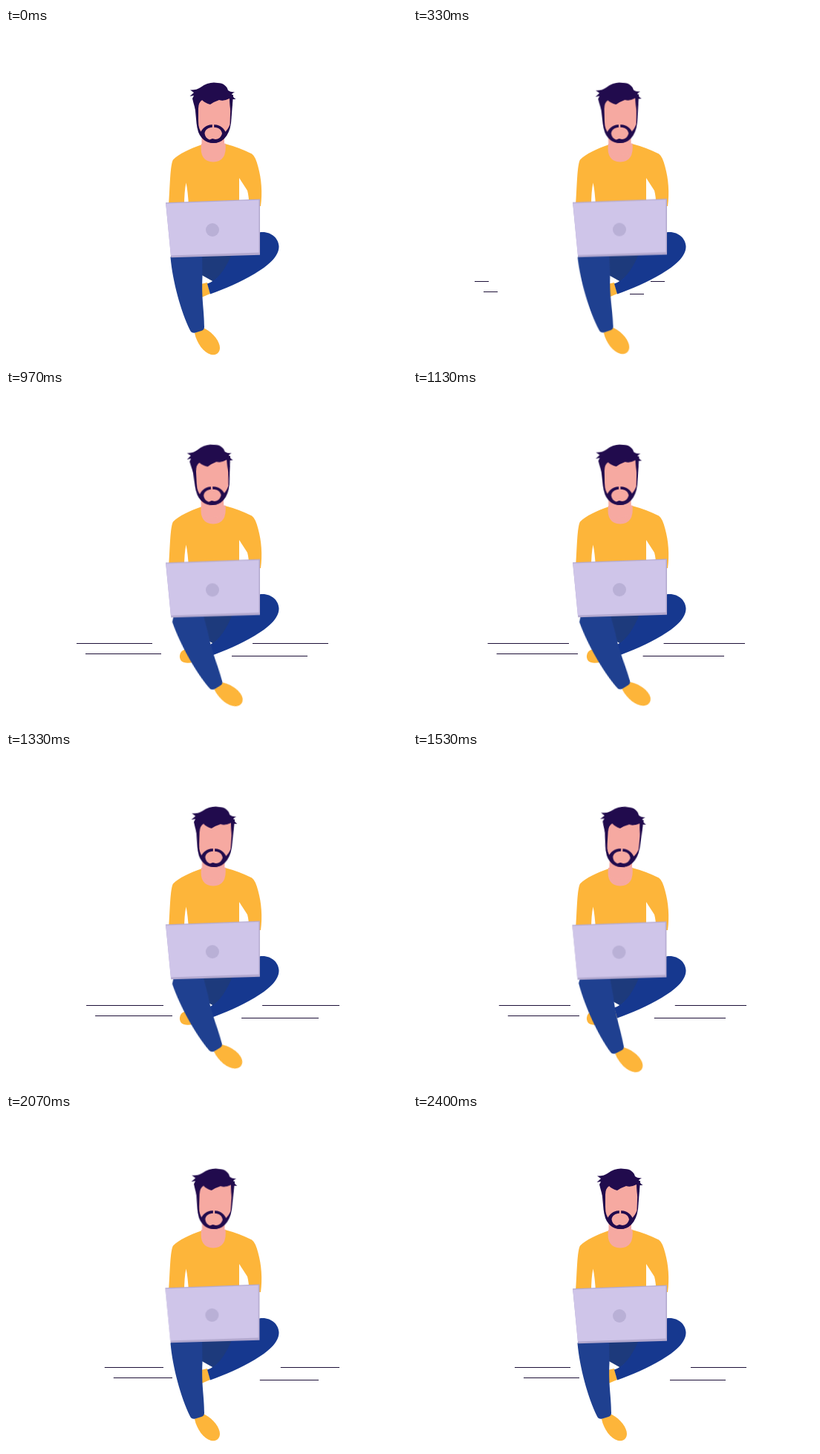
An HTML page that plays this animation: 540 by 450 pixels, repeating every 2430 ms.

```html
<!DOCTYPE html>
<html lang="en">
<head>
<meta charset="utf-8">
<title>Working on a laptop</title>
<style>
  :root { --loop: 2430ms; --ease: cubic-bezier(.333, 0, .667, 1); }
  html, body { margin: 0; width: 100%; height: 100%; overflow: hidden; background: #fff; }
  .stage { position: relative; width: 540px; height: 450px; overflow: hidden; }
  svg { position: absolute; inset: 0; display: block; }

  .hair { fill: #210b4d; }
  .skin { fill: #f6a9a1; }
  .yellow { fill: #fdb53a; }

  .head { transform-origin: 279px 170px; animation: sway var(--loop) var(--ease) infinite; }
  .leg { transform-origin: 237px 301px; animation: tap var(--loop) var(--ease) infinite; }
  .laptop { animation: lift var(--loop) var(--ease) infinite; }

  /* the box opens to the right while the stroke inside slides along */
  .line {
    position: absolute; height: 1px; overflow: hidden;
    animation: grow var(--loop) linear infinite;
  }
  .line::before {
    content: ""; display: block; width: 129px; height: 100%; background: #1d1038;
    animation: trail var(--loop) var(--ease) infinite;
  }

  @keyframes sway {
    0%, 100% { transform: rotate(0); }
    33.33% { transform: rotate(-3.6deg); }
    66.67% { transform: rotate(3.6deg); }
  }
  @keyframes tap {
    0%, 6.2% { transform: rotate(0); }
    44.5%, 50% { transform: rotate(-14.8deg); }
    83%, 100% { transform: rotate(0); }
  }
  @keyframes lift {
    0%, 2% { transform: translate(0, 0); }
    50% { transform: translate(0, -3px); }
    73% { transform: translate(-1px, -1.9px); }
    100% { transform: translate(0, 0); }
  }
  @keyframes grow {
    0%, 1.2% { width: 0; }
    5.4% { width: 2px; }
    9.5% { width: 9px; }
    13.6% { width: 19px; }
    21.8% { width: 48.5px; }
    27.6% { width: 75px; }
    39.9% { width: 114px; }
    44% { width: 124.5px; }
    48.5%, 100% { width: 129px; }
  }
  @keyframes trail {
    0%, 13.6% { transform: translateX(0); }
    100% { transform: translateX(54px); }
  }
</style>
</head>
<body>
<div class="stage">
  <div class="line" style="left:83px; top:341px"></div>
  <div class="line" style="left:95px; top:355px"></div>
  <div class="line" style="left:320px; top:341px"></div>
  <div class="line" style="left:292px; top:358px"></div>

  <svg width="540" height="450" viewBox="0 0 540 450">
    <!-- folded leg -->
    <path class="yellow" d="M271 343 L275 358 L262 363.500 C251 368 241 369.500 236 365 C232 360 234 352 240 350 L262 345 Z"/>
    <path fill="#1d3a7c" d="M245 295 H315 L300 325 L279 341.500 L262 332 Z"/>
    <path fill="#16388f" d="M310 285 L341 275.500 C356 273 367 283 367.500 294 C368 308 352 321 335 331 C315 343 295 351 275 358.500 L271 344.500 Q289 339 303 307 Z"/>

    <!-- tapping leg -->
    <g class="leg">
      <path class="yellow" d="M254 411 L267 404.500 C280 411 288 423 288 431 C288 438 282 441.500 276 440 C266 437 257 425 254 411 Z"/>
      <path fill="#1f4090" d="M232 288 L221.500 309 C224.500 342 235.500 382 248 407.500 Q250 411.500 255 410.500 L263 408 Q267 407 267 403 C267 380 263 365 264.500 335 L264 285 Z"/>
    </g>

    <!-- torso -->
    <path class="yellow" d="M264 157 C247 163 233 169.500 225 177.500 C221 185 221 210 219 240 H240 Q240 220 242.500 208.500 Q245 220 246 240 H314 V202 L325 219 Q327 226 327.500 240 H343 C345.500 222 344 203 339.500 187 Q336 173 331 169.500 Q314 161 295 156 Z"/>
    <path class="skin" d="M263 156 Q260 180 279 180.500 Q298 180 295.500 155.500 Z"/>

    <!-- head -->
    <g class="head">
      <path class="skin" d="M263.500 140 H294 V168 Q279 176 263.500 168 Z"/>
      <path class="hair" d="M253 90 L256.500 128 Q258 142 263 147 Q271 155 279 155 Q288 155 294 149 Q301 142 303 128 L306 90 Z"/>
      <path class="skin" d="M259 104 Q262 96 265 97 Q270 101 274 102 Q281 98 286 96 Q294 99 301 94 Q303 112 301.500 130 Q299 137 294 141 H264 Q259 137 259 125 Z"/>
      <path class="hair" d="M261 143 C264 134 272 129 279 130.500 C286 129 294 134 297 143 C294 151 287 155 279 155 C271 155 264 151 261 143 Z"/>
      <path class="skin" d="M267.500 142 C268 136 274 133.500 279 134 C285 133.500 290 136 291 142 C290 147 286 150 282 150 L278 149 L274 150.500 C270 149 268 146 267.500 142 Z"/>
      <path class="skin" d="M278 129 h2 l.4 6 h-2.800 Z"/>
      <path class="hair" d="M252.500 101 L251 95 L253 91 L247.500 92 Q251 89 253 87 L248 83.500 Q256 84 262 80 C270 74 278 72.500 285 74 C293 74 298 79 299 84 Q303 87 308 86 L304 89 Q306 94 309.500 96 L305 96 L305 104 L302 108 L301 95 Q293 99 287 97 Q281 99 275 103 Q268 101 264 97 Q260 100 259.500 104 L258.500 113 L255 110 Z"/>
    </g>

    <!-- laptop -->
    <g class="laptop">
      <path fill="#b3a9cf" d="M215 235.300 L342 230.500 V305.800 L222.300 309.300 Z"/>
      <path fill="#cfc5e9" d="M215.300 236.500 L340.500 231.800 V302.500 L221.800 306.500 Z"/>
      <circle cx="278" cy="272" r="9" fill="#b9b0d6"/>
    </g>
  </svg>
</div>
</body>
</html>
```
